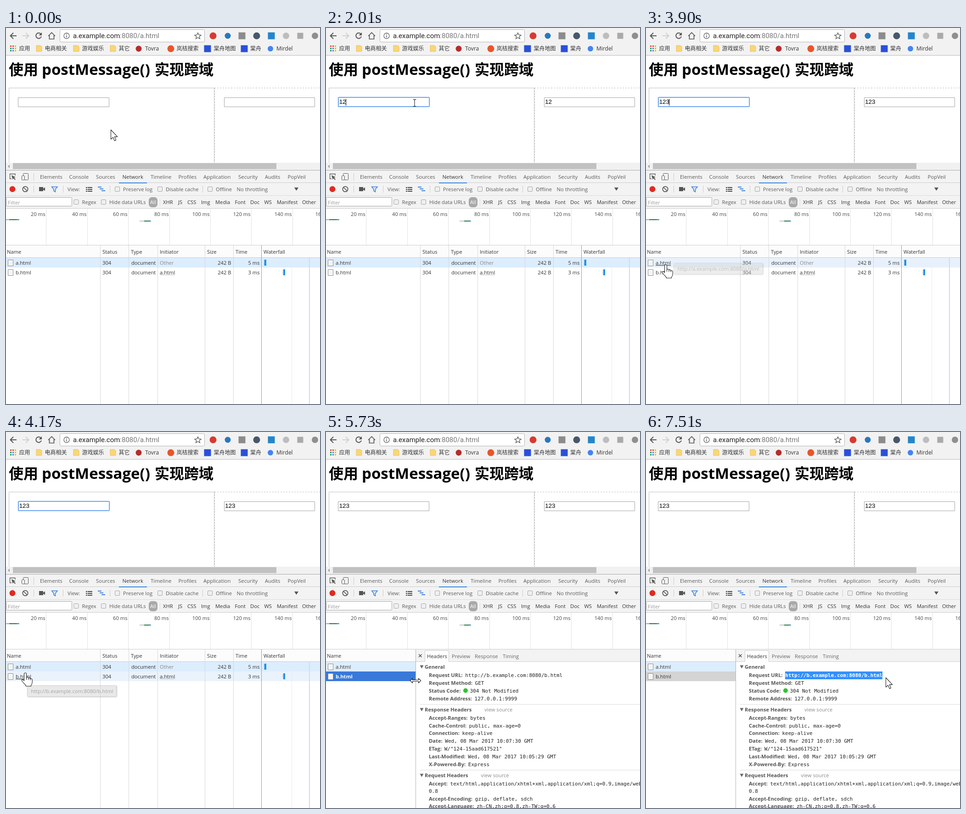
An HTML page with a canvas that plays this animation: 684x818 px, repeating every 8820 ms.

```html
<!DOCTYPE html>
<html lang="zh">
<head>
<meta charset="utf-8">
<style>
html, body { margin: 0; width: 684px; height: 818px; overflow: hidden; background: #fff; }
canvas { display: block; }
</style>
</head>
<body>
<canvas id="stage" width="684" height="818"></canvas>
<script>
const ctx = document.getElementById('stage').getContext('2d');
const LOOP = 8820;
const CJK = '"Noto Sans CJK SC", "Noto Sans CJK", sans-serif';
const UI = '11.2px "Open Sans", "Noto Sans", sans-serif';
const BOLD = 'bold ' + UI;
const TAB = UI.replace('11.2', '11.4');
const MONO = '11px "DejaVu Sans Mono", monospace';
const BOOKMARK = '12px "Open Sans", ' + CJK;
const INPUT = '13.33px "Liberation Sans", Arial, sans-serif';

// ---- drawing helpers ----
function rect(x, y, w, h, color) {
  ctx.fillStyle = color;
  ctx.fillRect(x, y, w, h);
}
const hline = (x, y, w, color = '#ccc') => rect(x, y, w, 1, color);
const vline = (x, y, h, color = '#ccc') => rect(x, y, 1, h, color);

function text(s, x, y, color = '#333', font = UI, align = 'left') {
  ctx.font = font;
  ctx.textAlign = align;
  ctx.fillStyle = color;
  ctx.fillText(s, x, y);
  return ctx.measureText(s).width;
}

function paint(path, fill, stroke, width = 1) {
  if (fill) { ctx.fillStyle = fill; ctx.fill(path); }
  if (stroke) { ctx.strokeStyle = stroke; ctx.lineWidth = width; ctx.stroke(path); }
}
const shape = (d, fill, stroke, width) => paint(new Path2D(d), fill, stroke, width);

function box(x, y, w, h, fill, stroke, radius = 0) {
  const p = new Path2D();
  p.roundRect(x + .5, y + .5, w - 1, h - 1, radius);
  paint(p, fill, stroke);
}
function circle(x, y, r, fill, stroke, width) {
  const p = new Path2D();
  p.arc(x, y, r, 0, 2 * Math.PI);
  paint(p, fill, stroke, width);
}
const square = (x, y, size, color) => rect(x - size / 2, y - size / 2, size, size, color);

function checkbox(label, x, y) {
  box(x, y - 10, 11, 11, '#f0f0f0', '#a5a5a5', 1.5);
  text(label, x + 18, y, '#5a5a5a');
}

// ---- motion ----
const moves = [[400, 910, 9], [3440, 4270, 14], [4340, 4340, 1],
  [5520, 6340, 14], [6470, 6520, 2], [6720, 7510, 13]];
const path = [
  [340, 228, 221], [620, 218, 196], [846, 195, 166], [910, 193, 163],
  [3380, 193, 163], [3630, 95, 430], [3760, 55, 505], [3880, 43, 515],
  [4010, 43, 516], [4140, 42, 524], [4270, 42, 529], [4340, 41, 527],
  [5460, 41, 527], [5709, 195, 541], [5960, 331, 541], [6280, 310, 529],
  [6340, 308, 528], [6470, 306, 530], [6520, 303, 531], [6660, 303, 531],
  [6850, 397, 536], [7120, 468, 536], [7400, 518, 534], [7510, 522, 534]];

function snap(t) {
  const move = moves.findLast(m => t >= m[0]);
  if (!move) return 0;
  const [start, end, steps] = move;
  const step = (end - start) / (steps - 1) || 1;
  return start + Math.min(Math.floor((t - start) / step), steps - 1) * step;
}

function pointer(t) {
  const at = snap(t);
  const i = path.findIndex(p => p[0] >= at);
  const [t1, x1, y1] = path[i];
  const [t0, x0, y0] = path[Math.max(i - 1, 0)];
  const f = t1 > t0 ? (at - t0) / (t1 - t0) : 1;
  const x = x0 + (x1 - x0) * f, y = y0 + (y1 - y0) * f;
  let kind = 'arrow';
  if (x > 26 && x < 225 && y > 150 && y < 172) kind = 'text';
  else if (x > 20 && x < 57 && y >= 500 && y < 542) kind = 'hand';
  else if (t > 5090 && Math.abs(x - 195) < 5) kind = 'resize';
  else if (t >= 6470 && t < 6720) kind = 'text';
  return { x: Math.round(x), y: Math.round(y), kind };
}

function stateAt(t) {
  const p = pointer(t);
  const typed = [1650, 2010, 2510].filter(k => t >= k).length;
  const echoed = [1650, 2010, 2580].filter(k => t >= k).length;
  const focused = t >= 1170 && t < 5020;
  const caretOff = (t >= 3080 && t < 3580) || (t >= 4140 && t < 4720);
  return {
    t, pointer: p, focused,
    caret: focused && !caretOff,
    left: '123'.slice(0, typed),
    right: '123'.slice(0, echoed),
    panel: t >= 5090,
    dragging: t >= 6720,
    hoverRow: t > 3440 && p.y >= 500 && p.y < 542 ? (p.y < 521 ? 0 : 1) : -1
  };
}

// ---- browser chrome ----
function drawBrowser() {
  rect(0, 0, 684, 60, '#f2f2f2');
  hline(0, 59, 684, '#b8b8b8');
  const ink = '#555';
  shape('M23 17H10M16 10.5L9.5 17L16 23.5', null, ink, 2);
  shape('M36 17H49M43 10.5L49.5 17L43 23.5', null, '#cfcfcf', 2);
  shape('M76 13A6 6 0 1 0 77 18.5', null, ink, 2);
  shape('M78 9.5V16H71.5Z', ink);
  shape('M92 17.5L99.5 10L107 17.5M94.5 16V24H104.5V16', null, ink, 1.7);
  box(117, 3, 316, 28, '#fff', '#b4b4b4', 3);
  circle(132, 17, 6, null, '#666', 1.3);
  rect(131.3, 16, 1.5, 4.5, '#666');
  rect(131.3, 13.2, 1.5, 1.6, '#666');
  const url = '15px Roboto, sans-serif';
  const host = text('a.example.com', 146, 22, '#222', url);
  text(':8080/a.html', 146 + host, 22, '#777', url);
  shape('M418 10.5L420 15L425 15.4L421.2 18.6L422.4 23.4L418 20.8L413.6 23.4L414.8 18.6L411 15.4L416 15Z', null, '#555', 1.3);

  circle(451, 17, 7.5, '#d93a2f');
  circle(483, 17, 6.5, '#2678c0');
  square(514, 17, 15, '#8c8c8c');
  circle(546, 17, 7.5, '#46586a');
  square(578, 17, 15, '#2486cc');
  circle(610, 17, 7, '#bdbdbd');
  square(641, 17, 13, '#aaa');
  circle(673, 17, 7, '#8f8f8f');

  const dots = ['#db4437', '#db4437', '#f4b400', '#0f9d58', '#4285f4', '#f4b400', '#0f9d58', '#4285f4', '#f4b400'];
  dots.forEach((c, i) => rect(9 + i % 3 * 5, 38 + Math.floor(i / 3) * 5, 3, 3, c));
  const label = (s, x) => text(s, x, 49, '#333', BOOKMARK);
  label('应用', 28.5);
  [['电商相关', 66], ['游戏娱乐', 147], ['其它', 227]].forEach(([s, x]) => {
    shape(`M${x} 38H${x + 9}L${x + 10} 40H${x + 12}V51H${x}Z`, '#fad678', '#ecc25b');
    label(s, x + 18.5);
  });
  circle(289, 45, 6.5, '#b92b27');
  label('Tovra', 303);
  circle(359, 45, 7.5, '#e9552b');
  label('岚桔搜索', 371.5);
  square(439, 45, 15, '#2b50d8');
  label('棠舟地图', 452.5);
  square(519, 45, 15, '#2b50d8');
  label('棠舟', 532);
  circle(576, 45, 6, '#4285f4');
  label('Mirdel', 589);
}

// ---- web page ----
function drawPage(s) {
  const heading = 'bold 32px ' + CJK;
  text('使用', 6, 102, '#000', heading);
  text('postMessage()', 78, 102, '#000', 'bold 33px "Open Sans", "Noto Sans", sans-serif');
  text('实现跨域', 324, 102, '#000', heading);

  hline(6, 130, 448, '#c0c0c0');
  vline(6, 130, 163, '#c0c0c0');
  vline(453, 130, 163, '#c8c8c8');
  for (let x = 454; x < 684; x += 6) hline(x, 130, 3, '#bbb');
  for (let y = 130; y < 293; y += 6) vline(454, y, 3, '#bbb');

  box(26, 151, 199, 21, '#fff', '#a6a6a6');
  box(475, 151, 198, 21, '#fff', '#a6a6a6');
  if (s.focused) {
    box(26, 150, 200, 22, '#fff', '#4f94ee', 1.5);
    box(27, 151, 198, 20, null, '#8cb8f2');
  }
  const width = text(s.left, 28.7, 165, '#000', INPUT);
  text(s.right, 477.2, 165, '#000', INPUT);
  if (s.caret) vline(Math.floor(28.7 + width), 154, 15, '#000');

  rect(0, 293, 684, 16, '#f1f1f1');
  rect(15, 294, 574, 13, '#c1c1c1');
  shape('M8 297V305L4 301Z', '#a3a3a3');
}

// ---- developer tools ----
function drawToolbars() {
  rect(0, 309, 684, 84, '#f3f3f3');
  hline(0, 309, 684, '#a8a8a8');
  hline(0, 336, 684);
  hline(0, 364, 684, '#dadada');
  hline(0, 392, 684);

  shape('M12 328H8.5V317.5H20V321', null, '#5a5a5a', 1.3);
  shape('M12 320L21 324.5L17.5 325.5L21 329L19.5 330.5L16 327L14.5 330Z', '#5a5a5a');
  box(37, 316, 12, 15, null, '#5a5a5a', 1);
  box(34, 321, 7, 10, '#f3f3f3', '#5a5a5a', 1);
  vline(60, 316, 16);
  [['Elements', 74], ['Console', 137.5], ['Sources', 196], ['Network', 253.5], ['Timeline', 315], ['Profiles', 375.5],
    ['Application', 430], ['Security', 506], ['Audits', 564], ['PopVeil', 613.5]]
    .forEach(([s, x]) => text(s, x, 328, s === 'Network' ? '#333' : '#5a5a5a', TAB));
  rect(246, 336, 61, 2, '#3f87e0');

  circle(14, 350.5, 6.5, '#e02a20');
  circle(42, 350.5, 5.7, null, '#555', 1.7);
  shape('M38 346.5L46 354.5', null, '#555', 1.7);
  shape('M72 346H81V349.5L85 346.5V354.5L81 351.5V355H72Z', '#555');
  shape('M99.5 345.5H112L107.5 351V356.5L104 354.5V351Z', '#dcebff', '#3b82e0', 1.5);
  [60, 124, 226, 428].forEach(x => vline(x, 343, 15));
  text('View:', 134, 355, '#5a5a5a');
  for (let i = 0; i < 3; i++) {
    rect(174, 346 + i * 4, 3, 2, '#444');
    rect(178, 346 + i * 4, 10, 2, '#444');
    rect(200 + i * 4, 345 + i * 4, 8, 2, '#3b82e0');
  }
  checkbox('Preserve log', 237, 355);
  checkbox('Disable cache', 330, 355);
  checkbox('Offline', 439, 355);
  text('No throttling', 502.5, 355, '#5a5a5a', TAB);
  shape('M628 347H637L632.5 354Z', '#555');

  box(0, 368, 144, 20, '#fff', '#a5a5a5', 2);
  text('Filter', 4, 384, '#999', TAB);
  checkbox('Regex', 147.5, 383);
  checkbox('Hide data URLs', 207, 383);
  box(311, 368, 19, 22, '#a8a8a8', '#a8a8a8', 6);
  text('All', 314, 383, '#fff');
  vline(335, 372, 15, '#ddd');
  [['XHR', 342], ['JS', 375], ['CSS', 395], ['Img', 425], ['Media', 456], ['Font', 498.5], ['Doc', 532],
    ['WS', 562.5], ['Manifest', 590], ['Other', 645]].forEach(([s, x]) => text(s, x, 383));
}

function activity(x, y, idle, busy, idleColor) {
  rect(x, y, idle, 2, idleColor);
  rect(x + idle, y, busy, 2, '#1c7a3c');
}

function drawOverview() {
  rect(0, 393, 684, 79, '#fff');
  for (let i = 1; i < 9; i++) {
    const x = Math.round(89.4 * i - 2);
    vline(x, 393, 79, '#e2e2e2');
    text(i * 20 + ' ms', x - 1.5, 409, '#444', UI, 'right');
  }
  activity(0, 416, 7, 17, '#9bb5a5');
  rect(24, 416, 5, 2, '#2d8ee0');
  activity(291, 419, 10, 12, '#c4c4c4');
  rect(313, 419, 3, 2, '#2d8ee0');
  hline(0, 472, 684);
}

function drawName(s, row) {
  const y = 515 + row * 21;
  const chosen = s.panel && row === 1 && !s.dragging;
  box(4, y - 11, 12, 14, '#fafafa', '#8a8a8a');
  shape(`M7 ${y - 4}L10 ${y - 7}M8 ${y}L13 ${y - 5}`, null, '#ddd');
  const name = row ? 'b.html' : 'a.html';
  const width = text(name, 21, y, chosen ? '#fff' : '#333', chosen ? BOLD : UI);
  if (s.pointer.kind === 'hand' && s.hoverRow === row) hline(21, y + 1, width, chosen ? '#fff' : '#333');
}

function drawTable(s) {
  rect(0, 473, 684, 345, '#fff');
  rect(0, 473, 684, 26, '#fcfcfc');
  hline(0, 499, 684);
  const end = s.panel ? 195 : 684;
  rect(0, 500, end, 21, s.hoverRow === 0 && !s.panel ? '#e8f1fb' : '#dcedfe');
  if (s.panel) rect(0, 521, end, 21, s.dragging ? '#d4d4d4' : '#3879d9');
  else if (s.hoverRow === 1) rect(0, 521, end, 21, '#eaf2fc');
  text('Name', 2, 491);
  if (!s.panel) drawColumns();
  drawName(s, 0);
  drawName(s, 1);
}

function drawColumns() {
  [['Status', 205], ['Type', 267], ['Initiator', 330], ['Size', 433], ['Time', 495], ['Waterfall', 556]]
    .forEach(([s, x]) => {
      vline(x, 473, 345, s === 'Waterfall' ? '#9a9a9a' : '#d8d8d8');
      text(s, x + 5, 491);
    });
  vline(622, 500, 318, '#ebebeb');
  rect(660, 500, 2, 318, '#d6d6fa');
  [['5 ms', 515], ['3 ms', 536]].forEach(([time, y]) => {
    text('304', 210, y);
    text('document', 273, y);
    text('242 B', 490.5, y, '#333', UI, 'right');
    text(time, 552.5, y, '#333', UI, 'right');
  });
  text('Other', 335, 515, '#888');
  hline(335, 537, text('a.html', 335, 536));
  rect(562, 504, 1, 13, '#8fc4ee');
  rect(563, 504, 4, 13, '#2390ea');
  rect(602, 527, 1, 9, '#ccc');
  rect(604, 525, 4, 13, '#2390ea');
}

function section(title, y, source) {
  shape(`M204.5 ${y - 7.5}H212.5L208.5 ${y - .5}Z`, '#666');
  const width = text(title, 215, y, '#555', BOLD);
  if (source) text('view source', 215 + width + 28, y, '#8a8a8a');
}

function headerRows(rows, top) {
  rows.forEach(([key, value], i) => {
    const y = Math.round(top + i * 16.85);
    let x = 224 + text(key + ':', 224, y, '#555', BOLD) + 5.6;
    if (key === 'Status Code') {
      circle(x + 5, y - 4.5, 5, '#2fc42f');
      x += 14.5;
    }
    text(value, x, y, '#222', MONO);
  });
}

function drawSelection(s) {
  const url = 'http://b.example.com:8080/b.html';
  ctx.font = BOLD;
  const x = 224 + ctx.measureText('Request URL:').width + 5.6;
  const count = Math.max(0, Math.min(url.length, Math.round((s.pointer.x - x) / 6.6) - 1));
  if (!count) return;
  ctx.font = MONO;
  const width = ctx.measureText(url.slice(0, count)).width;
  rect(Math.round(x), 521, Math.round(width), 17, '#3390ff');
  text(url.slice(0, count), x, 533, '#fff', 'bold ' + MONO);
}

function drawPanel(s) {
  rect(196, 473, 488, 26, '#f3f3f3');
  rect(196, 500, 488, 318, '#fff');
  vline(195, 473, 345, '#b5b5b5');
  shape('M202 483.5L208.5 490M208.5 483.5L202 490', null, '#444', 1.3);
  box(215, 475, 53, 25, '#fff', '#ccc');
  rect(216, 499, 51, 1, '#fff');
  [['Headers', 220], ['Preview', 274], ['Response', 324], ['Timing', 385]]
    .forEach(([name, x], i) => text(name, x, 492, i ? '#666' : '#333'));

  section('General', 515);
  headerRows([['Request URL', 'http://b.example.com:8080/b.html'], ['Request Method', 'GET'],
    ['Status Code', '304 Not Modified'], ['Remote Address', '127.0.0.1:9999']], 533.3);
  hline(204, 592, 480, '#ddd');
  section('Response Headers', 608, true);
  headerRows([['Accept-Ranges', 'bytes'], ['Cache-Control', 'public, max-age=0'], ['Connection', 'keep-alive'],
    ['Date', 'Wed, 08 Mar 2017 10:07:30 GMT'], ['ETag', 'W/"124-15aad617521"'],
    ['Last-Modified', 'Wed, 08 Mar 2017 10:05:29 GMT'], ['X-Powered-By', 'Express']], 625.7);
  hline(204, 735, 480, '#ddd');
  section('Request Headers', 751, true);
  headerRows([['Accept', 'text/html,application/xhtml+xml,application/xml;q=0.9,image/webp']], 769);
  text('0.8', 224, 785, '#222', MONO);
  headerRows([['Accept-Encoding', 'gzip, deflate, sdch'], ['Accept-Language', 'zh-CN,zh;q=0.8,zh-TW;q=0.6']], 801.5);
  if (s.dragging) drawSelection(s);
}

// ---- overlays ----
function tooltip(s, x, y, alpha) {
  ctx.save();
  ctx.globalAlpha = alpha;
  ctx.shadowColor = 'rgba(0,0,0,.3)';
  ctx.shadowBlur = 3;
  ctx.shadowOffsetX = ctx.shadowOffsetY = 1;
  box(x, y, 195, 25, '#f8f8f8', '#b8b8b8', 1);
  ctx.shadowColor = 'transparent';
  text(s, x + 8.5, y + 17, '#555');
  ctx.restore();
}

function drawTooltips(t) {
  if (t >= 3880 && t < 4080) tooltip('http://a.example.com:8080/a.html', 60, 511, t < 3950 ? .3 : .9);
  if (t >= 4140 && t < 5090) tooltip('http://b.example.com:8080/b.html', 46, 551, Math.min(1, .3 + (t - 4140) / 180));
}

const cursors = {
  arrow: 'M.5.5V21L5.2 16.8L8.4 24.4L11.6 23L8.4 15.6H14.8Z',
  hand: 'M-2.5 2Q-2.5 0 0 0Q2.5 0 2.5 2V10Q5 8.5 7 11Q9.5 9.8 11 12.5Q15.2 12 15.2 16V20Q15.2 24 12.5 27V29H1V27Q-3 23 -7 18Q-9 14.5 -5.5 14.5L-2.5 17Z',
  resize: 'M-11.5 0L-6.5 -5V-1.5H6.5V-5L11.5 0L6.5 5V1.5H-6.5V5Z',
  text: 'M-3.5 -7.5H-1L0 -6.5L1 -7.5H3.5M0 -6.5V6.5M-3.5 7.5H-1L0 6.5L1 7.5H3.5'
};

function drawPointer({ x, y, kind }) {
  ctx.save();
  ctx.translate(x, y);
  ctx.lineJoin = 'round';
  shape(cursors[kind], kind === 'text' ? null : '#fff', '#222', 1.1);
  if (kind === 'hand') shape('M2.5 10V15M7 11V15.5M11 12.5V16', null, '#222', 1.1);
  ctx.restore();
}

function frame() {
  const s = stateAt(performance.now() % LOOP);
  rect(0, 0, 684, 818, '#fff');
  drawBrowser();
  drawPage(s);
  drawToolbars();
  drawOverview();
  drawTable(s);
  if (s.panel) drawPanel(s);
  drawTooltips(s.t);
  drawPointer(s.pointer);
  requestAnimationFrame(frame);
}
frame();
</script>
</body>
</html>
```
